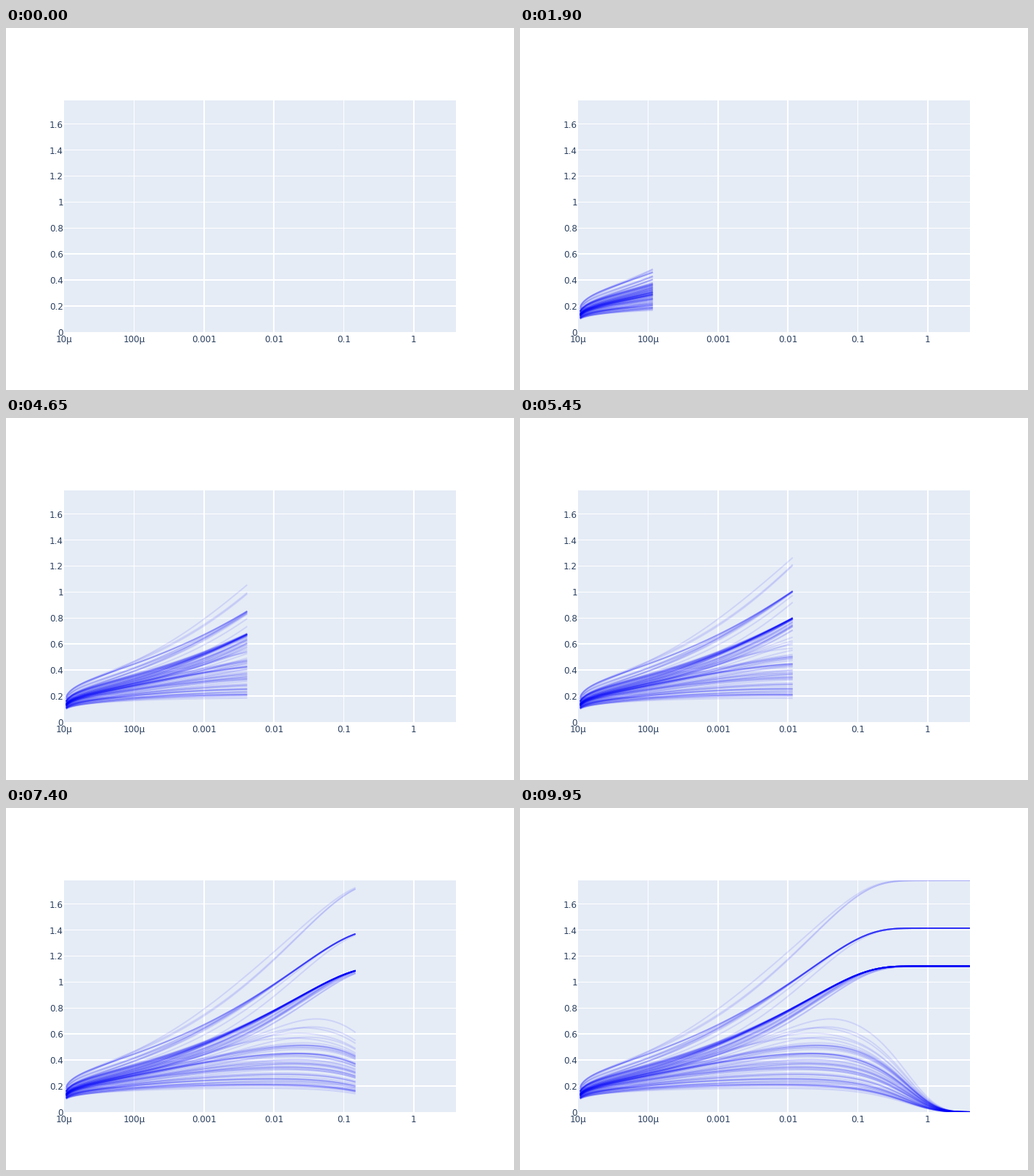
Animation of 700x500 px, one loop 10000 ms. Source, as a matplotlib script:

```python
import math

import numpy as np
import matplotlib.pyplot as plt
from matplotlib.animation import FuncAnimation
from matplotlib.collections import LineCollection
from matplotlib.patches import Rectangle

W, H, DPI = 700, 500, 100
LEFT, RIGHT, TOP, BOTTOM = 80, 620, 100, 420
FRAMES, INTERVAL = 200, 50
T0, T1 = 1e-5, 4.0
V_MAX = 2 ** (5 / 6)
PX = 72 / DPI  # one pixel in points

plt.rcParams["font.family"] = "DejaVu Sans"

rng = np.random.default_rng(11)
t = np.logspace(np.log10(T0), np.log10(T1), FRAMES)
tau = t - T0


def x_px(time):
    return LEFT + (RIGHT - LEFT) * np.log10(time / T0) / np.log10(T1 / T0)


def y_px(value):
    return BOTTOM - (BOTTOM - TOP) * value / V_MAX


# Tube radii obey dr/dt = 4 Q^2 / r^5 - 2 r, so r^6 has a closed form.
def start6():
    return rng.uniform(0.085, 0.097) ** 6 * np.exp(-12 * tau)


def winner(q0, q_end, tc, power):
    """Radius of a tube whose flow settles from q0 to q_end."""
    q = q_end * (q0 / q_end) ** np.exp(-(tau / tc) ** power)
    return (start6() + 2 * q ** 2 * (1 - np.exp(-12 * tau))) ** (1 / 6)


def loser(peak):
    """Radius of a tube that swells to about peak, then loses its flow."""
    q0 = min(0.6 * (peak / 0.6) ** 0.6, 0.58) * np.exp(rng.normal(0, 0.22))
    tc = (1.17 * peak) ** 6 / (24 * q0 ** 2)
    n = 0.55 + 1.2 * np.clip((peak - 0.5) / 0.15, 0, 1)

    def swell(time):
        s = time / tc
        return s / (1 + s ** n) ** (1 / n) * np.exp(-12 * time)

    return (start6() + peak ** 6 * swell(tau) / swell(0.035)) ** (1 / 6)


def make_curves():
    curves = [winner(1.24, 4, 2.6e-4, 0.4),
              winner(1.58, 4, 1.4e-3, 0.3),
              winner(1.45, 4, 1.5e-3, 0.3),
              winner(0.61, 2, 4.4e-3, 0.4)]
    for _ in range(13):
        tc = 10 ** rng.uniform(-4, -2.4)
        curves.append(winner(rng.uniform(0.8, 1.9), 2, tc, 0.45))
    for _ in range(40):
        tc = 10 ** rng.uniform(-3.6, -1.35)
        curves.append(winner(rng.uniform(0.42, 1.1), 1, tc, 0.55))

    peaks = [0.715, 0.655, 0.645, 0.6, 0.575, 0.56, 0.53, 0.48, 0.42, 0.385,
             0.36, 0.32, 0.265, 0.22, 0.19, 0.175]
    clusters = [(0.51, 5), (0.495, 2), (0.445, 6), (0.43, 2), (0.4, 2),
                (0.37, 4), (0.34, 4), (0.325, 2), (0.287, 4), (0.25, 3),
                (0.238, 4), (0.21, 2), (0.2, 3), (0.194, 2)]
    for centre, count in clusters:
        peaks.extend(centre + rng.normal(0, 0.005, count))
    return curves + [loser(p) for p in peaks]


fig = plt.figure(figsize=(W / DPI, H / DPI), dpi=DPI, facecolor="white")
ax = fig.add_axes([0, 0, 1, 1])
ax.set_xlim(0, W)
ax.set_ylim(H, 0)
ax.axis("off")


def box(x0, y0, x1, y1, color, zorder):
    patch = Rectangle((x0, y0), x1 - x0, y1 - y0, facecolor=color,
                      linewidth=0, zorder=zorder)
    return ax.add_patch(patch)


def pixel_span(pos):
    """Whole pixels that a one pixel line at pos clearly touches."""
    return math.floor(pos - 0.3), math.ceil(pos + 0.3)


def label(x, y, text, align):
    ax.text(x, y, text, color="#2a3f5f", fontsize=12 * PX, ha=align,
            va="baseline", zorder=3)


panel = box(LEFT, TOP, RIGHT, BOTTOM, "#e5ecf6", 0)

for i, text in enumerate(["10µ", "100µ", "0.001", "0.01", "0.1", "1"]):
    x = x_px(T0 * 10 ** i)
    label(x, BOTTOM + 13.8, text, "center")
    if i:
        x0, x1 = pixel_span(x)
        box(x0, TOP, x1, BOTTOM, "white", 1)

for i in range(9):
    y = y_px(0.2 * i)
    label(LEFT - 1, y + 5, f"{0.2 * i:.1f}".replace(".0", ""), "right")
    if i:
        y0, y1 = pixel_span(y)
        box(LEFT, y0, RIGHT, y1, "white", 1)

xs = x_px(t)
paths = [np.column_stack([xs, y_px(r)]) for r in make_curves()]
lines = LineCollection([], colors=[(0, 0, 1, 0.1)], linewidths=2 * PX,
                       zorder=2, snap=False)
ax.add_collection(lines, autolim=False)
lines.set_clip_path(panel)


def update(frame):
    lines.set_segments([p[:frame + 1] for p in paths] if frame else [])
    return [lines]


anim = FuncAnimation(fig, update, frames=FRAMES, interval=INTERVAL,
                     repeat=True, repeat_delay=0, blit=False)
plt.show()
```
